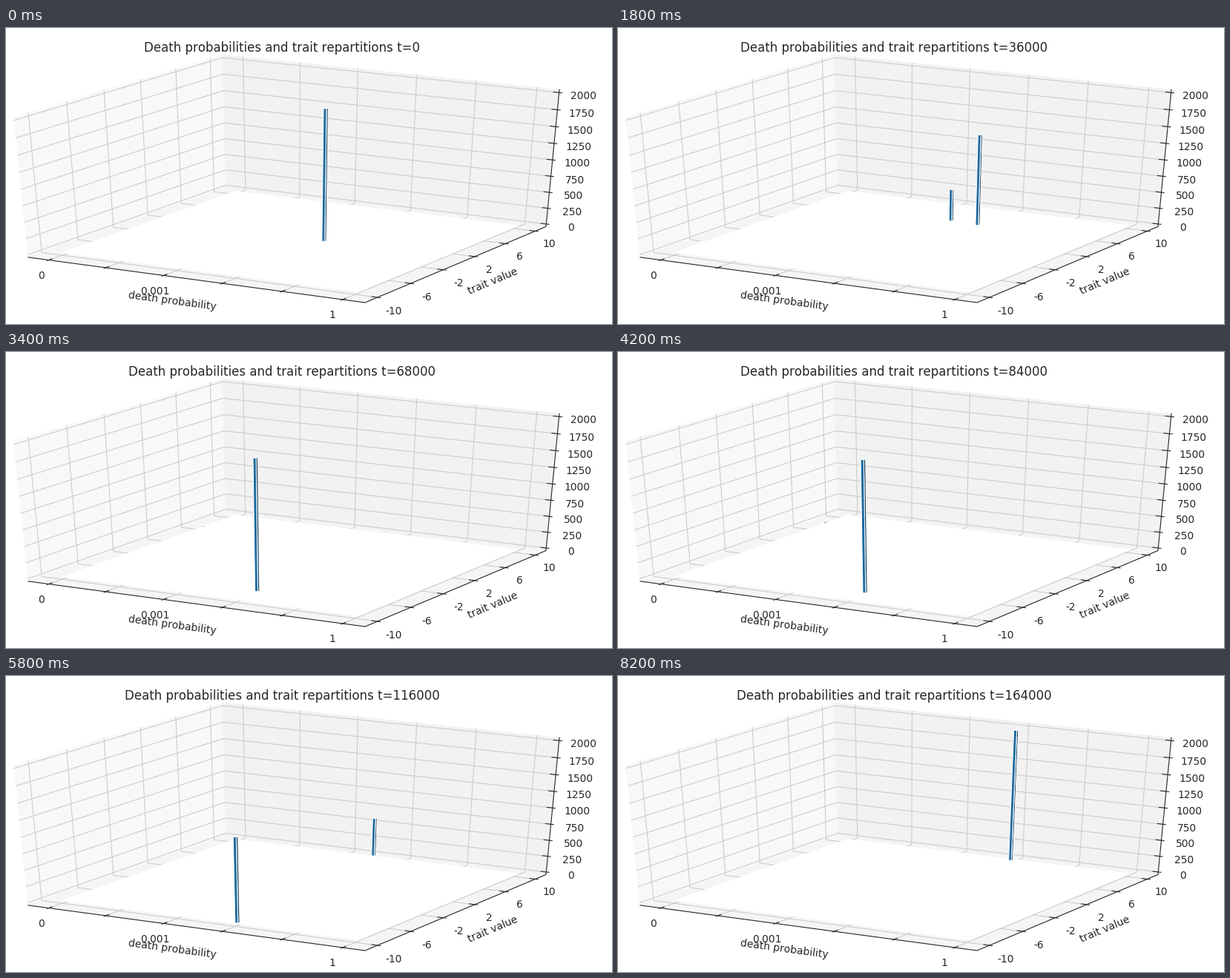
These frames come from a looping animation (817x400 px, 8.4 s). A matplotlib script:

```python
import matplotlib.pyplot as plt
import numpy as np
from matplotlib.animation import FuncAnimation

W, H, DPI = 817, 400, 100
FRAMES, STEP_MS = 42, 200
INK, GRID = "#262626", "#cccccc"
BLUE, SHADE = "#1c6a9f", "#103c58"

# Floor axes count tick steps 0..5, height runs 0..1; panes reach further.
SPAN = 5.5
LO, HI = 2.5 - SPAN * 25 / 48, 2.5 + SPAN * 25 / 48
ZLO, ZHI = -1 / 48, 49 / 48
CENTER, ZOOM = np.array([384.6, 197.7]), np.array([5032, -2072])
AZIM, ELEV, DIST = np.radians(-60), np.radians(30), 10

# Camera basis: towards the eye, to the right, and up.
EYE = np.array([np.cos(AZIM) * np.cos(ELEV), np.sin(AZIM) * np.cos(ELEV),
                np.sin(ELEV)])
RIGHT = np.array([-np.sin(AZIM), np.cos(AZIM), 0])
UP = np.cross(EYE, RIGHT)

plt.rcParams["text.kerning_factor"] = 6


def project(u, v, z):
    p = np.array([(u - 2.5) / SPAN, (v - 2.5) / SPAN, z - 0.5])
    return CENTER + ZOOM * (RIGHT @ p, UP @ p) / (DIST - EYE @ p)


fig = plt.figure(figsize=(W / DPI, H / DPI), dpi=DPI, facecolor="white")
ax = fig.add_axes([0, 0, 1, 1])
ax.set_xlim(0, W)
ax.set_ylim(H, 0)
ax.axis("off")


def pane(color, *corners, z=1):
    pts = [project(*c) for c in corners]
    ax.add_patch(plt.Polygon(pts, fc=color, ec=color, lw=0.5, zorder=z))


def path(color, *points, z=2):
    xs, ys = zip(*(project(*p) for p in points))
    ax.plot(xs, ys, color=color, lw=0.8, zorder=z, solid_joinstyle="miter")


def label(x, y, text, **kw):
    opts = dict(size=10, ha="center", va="center", color=INK,
                family="DejaVu Sans", zorder=6)
    return ax.text(x, y, text, **{**opts, **kw})


def draw_box():
    pane("#f8f8f8", (LO, LO, ZLO), (LO, HI, ZLO), (LO, HI, ZHI), (LO, LO, ZHI))
    pane("#f2f2f2", (LO, HI, ZLO), (HI, HI, ZLO), (HI, HI, ZHI), (LO, HI, ZHI))
    pane("#f5f5f5", (LO, LO, ZLO), (HI, LO, ZLO), (HI, HI, ZLO), (LO, HI, ZLO))

    for t in range(6):
        path(GRID, (t, LO, ZLO), (t, HI, ZLO), (t, HI, ZHI))
        path(GRID, (HI, t, ZLO), (LO, t, ZLO), (LO, t, ZHI))
    for z in np.linspace(0, 1, 9):
        path(GRID, (LO, LO, z), (LO, HI, z), (HI, HI, z))

    # Empty bars cover the floor in white.
    end = 5.05
    pane("white", (0, 0, 0), (end, 0, 0), (end, end, 0), (0, end, 0), z=3)

    path(INK, (LO, LO, ZLO), (HI, LO, ZLO), (HI, HI, ZLO), (HI, HI, ZHI), z=4)


def draw_ticks():
    out, inn = SPAN / 120, SPAN / 60
    for t, name in enumerate(["0", "", "0.001", "", "", "1"]):
        path(INK, (t, LO - out, ZLO), (t, LO + inn, ZLO), z=4)
        label(*project(t, LO, ZLO) + (-10.3 - 0.7 * t, 21.2), name)
    for t in range(6):
        path(INK, (HI - inn, t, ZLO), (HI + out, t, ZLO), z=4)
        label(*project(HI, t, ZLO) + (22 - 0.7 * t, 19 - 0.3 * t),
              str(4 * t - 10))
    for z in np.linspace(0, 1, 9):
        path(INK, (HI - inn, HI, z), (HI + out, HI, z), z=4)
        label(*project(HI, HI, z) + (33 - 0.5 * z, 5.2), f"{2000 * z:.0f}")
    label(224, 369, "death probability", rotation=-7.7)
    label(656, 342, "trait value", rotation=22.9)


draw_box()
draw_ticks()
title = label(372, 32, "", size=12, va="baseline")

TOTAL, LIFE = 2000, 5
TRAITS = 5.1   # the trait axis wraps around
HIDDEN = 1.18  # mutants too scattered to show as bars

# The main clan keeps one death class while its trait drifts.
MAIN_CLASS = 3
DRIFT_T = [0, 9, 14, 21, 29, 36, 41]
DRIFT_V = [2.6, 3.89, 5.8, 5.59, 5.14, 4.85, 4.95]

# Mutant clans: peak time, death class, trait, head count.
MUTANTS = [
    (9, 2.5, 3.95, 500), (9, 0, 0.76, 10), (14, 0, 4.03, 45),
    (21, 0, 4.36, 25), (29, 2.5, 5.05, 600), (36, 2.5, 4.87, 95),
    (36, 3.5, 4.77, 250), (36, 0, 4.79, 620), (36, 0, 1.38, 375),
]


class Bar:
    SIZE = 0.05

    def __init__(self):
        self.faces = [
            ax.add_patch(plt.Polygon(np.zeros((4, 2)), fc=c, ec="white", lw=0.8))
            for c in ("white", SHADE, BLUE)
        ]

    def update(self, u, v, heads):
        h = heads / TOTAL
        a, b = u - self.SIZE / 2, u + self.SIZE / 2
        w = v + self.SIZE
        boxes = [
            [(a, v, h), (b, v, h), (b, w, h), (a, w, h)],
            [(b, v, 0), (b, w, 0), (b, w, h), (b, v, h)],
            [(a, v, 0), (b, v, 0), (b, v, h), (a, v, h)],
        ]
        for k, (face, box) in enumerate(zip(self.faces, boxes)):
            face.set_xy([project(*p) for p in box])
            face.set_visible(heads > 0)
            face.set_zorder(5 - v / 10 + k / 1000)


bars = [Bar() for _ in range(len(MUTANTS) + 1)]


def update(i):
    title.set_text(f"Death probabilities and trait repartitions t={4000 * i}")
    spread = 0
    for bar, (peak, u, v, n) in zip(bars[1:], MUTANTS):
        heads = n * max(0, 1 - abs(i - peak) / LIFE)
        bar.update(u, v, heads)
        spread += heads
    trait = np.interp(i, DRIFT_T, DRIFT_V) % TRAITS
    bars[0].update(MAIN_CLASS, trait, TOTAL - HIDDEN * spread)
    return [title] + [face for bar in bars for face in bar.faces]


anim = FuncAnimation(fig, update, frames=FRAMES, interval=STEP_MS,
                     repeat=True, repeat_delay=0, blit=False)
plt.show()
```
